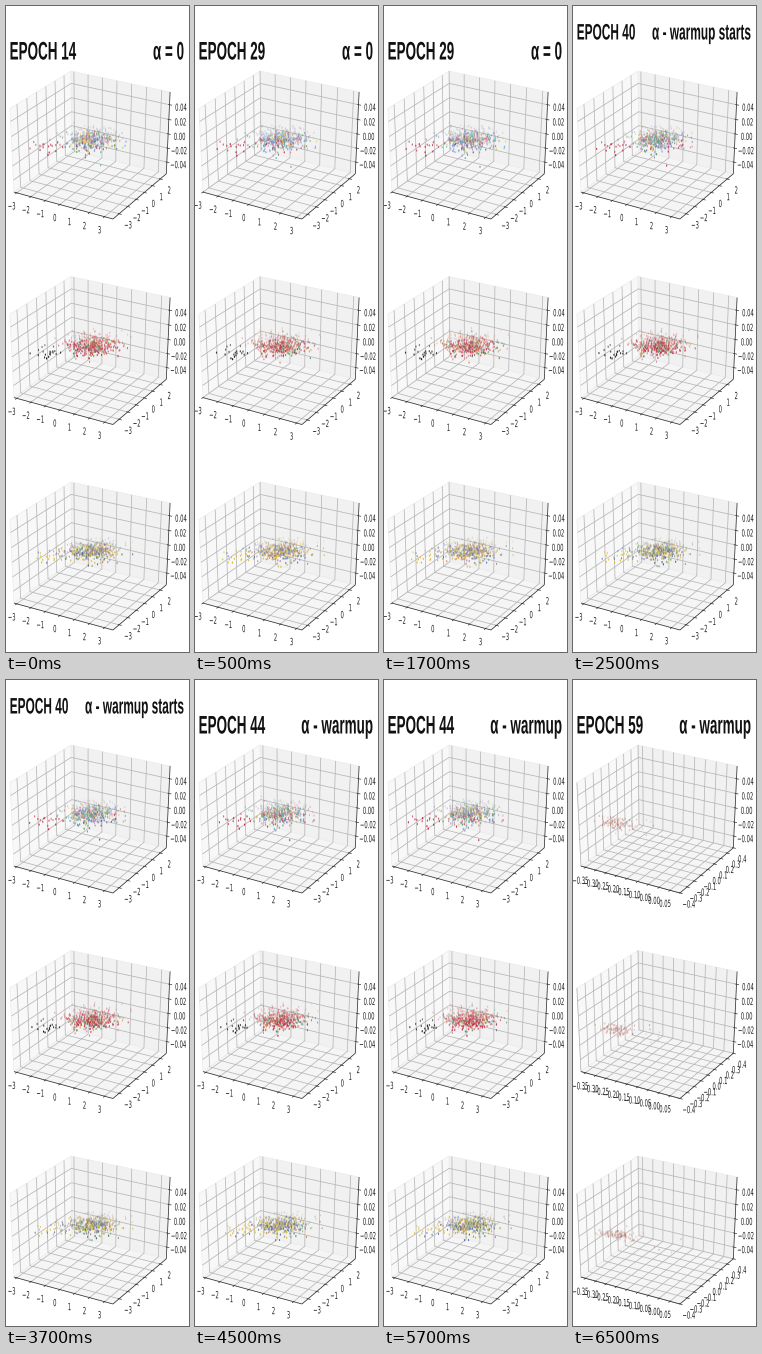
A matplotlib script that plays this animation: 183x646 px, repeating every 8 s.

```python
import numpy as np
import matplotlib.pyplot as plt
from matplotlib.animation import FuncAnimation
from matplotlib.patches import PathPatch, Polygon
from matplotlib.path import Path
from matplotlib.textpath import TextPath
from matplotlib.transforms import Affine2D

W, H, DPI = 183, 646, 100
STEP, LOOP = 500, 8000
SQUEEZE = 0.53                     # the whole picture is narrowed, lettering included
PANEL_TOPS = (0, 205.5, 411)
STARTS = (0, 500, 2500, 4500, 6500)

WIDE = dict(xlim=(-3.2, 3.55), ylim=(-3.7, 2.8), unit=1, decimals=0)
TIGHT = dict(xlim=(-3.0, 3.33), ylim=(-3.6, 2.75), unit=1, decimals=0)
SHRUNK = dict(xlim=(-0.372, 0.095), ylim=(-0.4, 0.4), unit=0.05, decimals=2)
ZLIM = (-0.057, 0.057)

STAGES = (
    dict(epoch=14, note="α = 0", view=WIDE),
    dict(epoch=29, note="α = 0", view=TIGHT),
    dict(epoch=40, note="α - warmup starts", view=WIDE, size=22.4, base=33.5),
    dict(epoch=44, note="α - warmup", view=WIDE),
    dict(epoch=59, note="α - warmup", view=SHRUNK),
)

PALETTES = (
    ("#5b7fc4", "#8e9fd8", "#d8c840", "#4f9d62", "#c9344a", "#58b5c4", "#9a8f86", "#d78fb0"),
    ("#c8263c", "#d8475a", "#b5304a", "#4f9a55", "#d98a3d", "#c8263c", "#7a6a72", "#d88ca0"),
    ("#d9bd3a", "#5c74b8", "#8f8f98", "#a080b4", "#d58a3c", "#d9bd3a", "#4d5a78", "#7fae7c"),
)
TAILS = (("#c01c38", "#d04860"), ("#151515", "#2c2c34"), ("#dcb820", "#5c74b8"))
DOT = Path.unit_circle().transformed(Affine2D().scale(SQUEEZE, 1))

fig = plt.figure(figsize=(W / DPI, H / DPI), dpi=DPI, facecolor="white")
ax = fig.add_axes((0, 0, 1, 1))


def project(points, top):
    """Perspective view of the cube [-.5, .5]^3 from elevation 30, azimuth -60."""
    x, y, z = np.moveaxis(np.asarray(points, float), -1, 0)
    across = 0.866 * x + 0.5 * y
    up = -0.25 * x + 0.433 * y + 0.866 * z
    depth = 10 - (0.433 * x - 0.75 * y + 0.5 * z)
    return np.stack([85.3 + 1143 * across / depth,
                     top + 136.5 - 954 * up / depth], axis=-1)


def text(s, x, y, size, family="DejaVu Sans", weight="normal", align=0.5, color="#222222"):
    """Place text with y as baseline; align 0, 0.5, 1 means left, centre, right."""
    path = TextPath((0, 0), s, size=size, prop=dict(family=family, weight=weight))
    box = path.get_extents()
    shift = x - SQUEEZE * (box.x0 + align * box.width)
    place = Affine2D().scale(SQUEEZE, -1).translate(shift, y)
    ax.add_patch(PathPatch(path.transformed(place), fc=color, lw=0, zorder=5))


def line(points, top, color, width, zorder):
    ax.plot(*project(points, top).T, color=color, lw=width, zorder=zorder,
            solid_capstyle="butt")


def ticks(lim, step):
    first, last = np.ceil(lim[0] / step), np.floor(lim[1] / step)
    return np.arange(first, last + 1) * step


def unit(values, lim):
    return (values - lim[0]) / (lim[1] - lim[0]) - 0.5


def draw_axis(lim, step, decimals, grid, edge, outward, offset, top):
    for value in ticks(lim, step):
        t = unit(value, lim)
        line(grid(t), top, "#b6b6b6", 0.55, 2)
        anchor = np.array(edge(t))
        out = np.array(outward)
        line([anchor - 0.012 * out, anchor + 0.025 * out], top, "#333333", 0.5, 3)
        x, y = project(anchor, top) + offset
        label = f"{round(value, 4) + 0:.{decimals}f}".replace("-", "\u2212")
        text(label, x, y + 3.6, 9.9)
    line([edge(-0.5), edge(0.5)], top, "#333333", 0.55, 3)


def draw_box(view, top):
    a, b = -0.5, 0.5
    panes = (
        ([(a, a, a), (a, b, a), (a, b, b), (a, a, b)], "#f8f8f8"),
        ([(a, b, a), (b, b, a), (b, b, b), (a, b, b)], "#f1f1f1"),
        ([(a, a, a), (b, a, a), (b, b, a), (a, b, a)], "#f5f5f5"),
    )
    for corners, color in panes:
        ax.add_patch(Polygon(project(corners, top), fc=color, ec="#ececec", lw=0.5, zorder=1))

    step, decimals = view["unit"], view["decimals"]
    draw_axis(view["xlim"], step, decimals,
              lambda t: [(t, a, a), (t, b, a), (t, b, b)],
              lambda t: (t, a, a), (0, -1, 0), (-5, 13), top)
    draw_axis(view["ylim"], 2 * step if decimals else step, min(decimals, 1),
              lambda t: [(b, t, a), (a, t, a), (a, t, b)],
              lambda t: (b, t, a), (1, 0, 0), (9, 11), top)
    draw_axis(ZLIM, 0.02, 2,
              lambda t: [(a, a, t), (a, b, t), (b, b, t)],
              lambda t: (b, b, t), (1, 0, 0), (11.5, 2.5), top)


def cloud(stage, panel):
    """Latent points and their RGBA colours for one panel."""
    place = np.random.default_rng(40 + panel)
    tint = np.random.default_rng(100 * stage + panel)
    if STAGES[stage]["view"] is SHRUNK:
        xy = np.concatenate([place.normal(-0.25, 0.04, (110, 2)),
                             place.normal((-0.18, -0.22), 0.07, (22, 2))])
        colors = tint.choice(["#b83246", "#c86a58", "#8a7a78", "#c8a070"], len(xy))
        alpha = tint.uniform(0.18, 0.42, len(xy))
    else:
        core = place.normal(0, 0.74, (470, 2))
        tail = place.normal((-1.75, -2.1), (0.5, 0.55), (20, 2))
        xy = np.concatenate([core, tail]) + tint.normal(0, 0.04, (490, 2))
        weights = tint.uniform(0.6, 1.4, 8)
        colors = np.concatenate([
            tint.choice(PALETTES[panel], len(core), p=weights / weights.sum()),
            tint.choice(TAILS[panel], len(tail), p=(0.8, 0.2))])
        nearness = 0.433 * xy[:, 0] - 0.75 * xy[:, 1]
        alpha = np.clip(0.55 + 0.28 * nearness, 0.25, 1)
    return xy, colors, alpha


def draw_points(stage, panel, top):
    view = STAGES[stage]["view"]
    xy, colors, alpha = cloud(stage, panel)
    x, y = unit(xy[:, 0], view["xlim"]), unit(xy[:, 1], view["ylim"])
    inside = (abs(x) < 0.5) & (abs(y) < 0.5)
    spots = project(np.stack([x, y, 0 * x], axis=-1), top)[inside]
    ax.scatter(*spots.T, s=2.7, marker=DOT, c=colors[inside], alpha=alpha[inside],
               linewidths=0, zorder=4)


def draw(frame):
    ax.cla()
    ax.set(xlim=(0, W), ylim=(H, 0))
    ax.axis("off")
    index = np.searchsorted(STARTS, frame * STEP, side="right") - 1
    stage = STAGES[index]
    title = dict(size=stage.get("size", 25.4), family="Liberation Sans",
                 weight="bold", color="#111111")
    base = stage.get("base", 53.5)
    text(f"EPOCH {stage['epoch']}", 4.5, base, align=0, **title)
    text(stage["note"], 177.5, base, align=1, **title)
    for panel, top in enumerate(PANEL_TOPS):
        draw_box(stage["view"], top)
        draw_points(index, panel, top)
    return []


anim = FuncAnimation(fig, draw, frames=LOOP // STEP, interval=STEP,
                     init_func=lambda: draw(0), repeat=True, repeat_delay=0)
plt.show()
```
